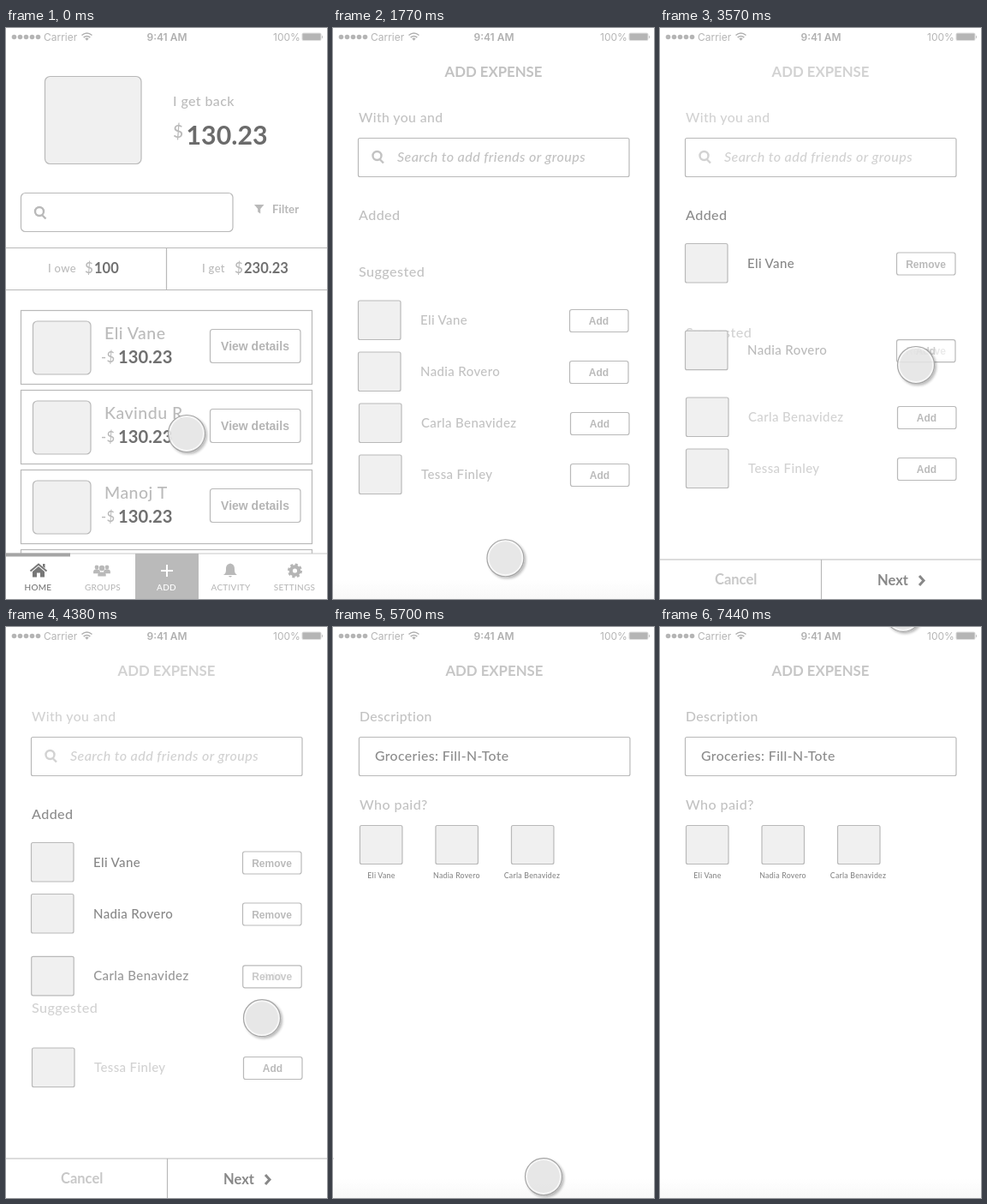
Write an HTML page that moves like this. It is 375 px wide and 666 px high and loops after 7.53 s.

```html
<!DOCTYPE html>
<html lang="en">
<head>
<meta charset="utf-8">
<title>Add expense wireframe</title>
<style>
html, body { margin: 0; width: 100%; height: 100%; overflow: hidden; background: #fff; }
svg { display: block; width: 375px; height: 666px; font-family: Lato, "Open Sans", sans-serif; font-weight: 500; }
text { letter-spacing: .025em; }
text[font-weight], .btn, .status text { letter-spacing: 0; }
.status { font-family: Inter, Roboto, sans-serif; font-weight: 400; }
.btn { font-family: "Liberation Sans", Arial, sans-serif; font-weight: 700; }
.dim { fill: var(--dim); }
.dimLine { stroke: var(--dim); }
</style>
</head>
<body>
<svg id="stage" viewBox="0 0 375 666"></svg>
<script>
const LOOP = 7530, LINE = '#b9b9b9';
const friends = ['Eli Vane', 'Nadia Rovero', 'Carla Benavidez', 'Tessa Finley'];
const debtors = ['Eli Vane', 'Kavindu R', 'Manoj T', ''];

const text = (x, y, size, fill, str, attrs = '') =>
  `<text x="${x}" y="${y}" font-size="${size}" fill="${fill}" ${attrs}>${str}</text>`;
const box = (x, y, w, h, r = 0, fill = '#fff', line = LINE) =>
  `<rect x="${x}" y="${y}" width="${w}" height="${h}" rx="${r}" fill="${fill}" stroke="${line}" stroke-width="1.2"/>`;
const path = (d, color = LINE, width = 1, attrs = '') =>
  `<path d="${d}" fill="none" stroke="${color}" stroke-width="${width}" ${attrs}/>`;
const solid = (d, fill) => `<path d="${d}" fill="${fill}"/>`;
const group = (id, body) => `<g id="${id}">${body}</g>`;
const thumb = (x, y, w, h, r) => box(x, y, w, h, r, '#f0f0f0');
const search = (x, y, color, attrs = '') =>
  path(`M${x + 5} ${y - 1}a5 5 0 1 0-10 0a5 5 0 1 0 10 0M${x + 3} ${y + 3}l4.5 4.5`, color, 2.4, attrs);
const bold = 'font-weight="700"';
const mid = 'text-anchor="middle"';
const title = attrs => text(187.5, 56.5, 16.8, '#c6c6c6', 'ADD EXPENSE', `${bold} ${mid} ${attrs}`);

function statusBar() {
  let s = '';
  for (let i = 0; i < 5; i++) s += `<circle cx="${9.5 + 7 * i}" cy="10.5" r="2.8" fill="#b5b5b5"/>`;
  return s + text(44, 14.5, 12, '#b5b5b5', 'Carrier')
    + path('M88.5 8.5q6-5 12 0M90.7 11q3.8-3 7.6 0', '#b0b0b0', 1.6)
    + solid('M92.3 12.3q2.2-1.6 4.4 0l-2.2 2.4z', '#b0b0b0')
    + text(188, 14.5, 12, '#b0b0b0', '9:41 AM', `font-weight="600" ${mid}`)
    + text(312, 14.5, 12, '#b5b5b5', '100%')
    + '<rect x="345.5" y="5.5" width="23" height="9.5" rx="2" fill="#dcdcdc"/>'
    + '<rect x="346.5" y="6.5" width="21" height="7.5" rx="1" fill="#b5b5b5"/>'
    + solid('M369 8.5q2 2 0 4z', '#b8b8b8');
}

function debtCard(name, i) {
  const y = 329.5 + 93 * i;
  return box(17.5, y, 340, 86) + thumb(31.5, y + 12.5, 67.5, 62, 5)
    + text(115, y + 33.5, 19.5, '#bbb', name)
    + text(111, y + 60.5, 16.5, '#bbb', '-$')
    + text(131, y + 61.5, 20.2, '#707070', '130.23', bold)
    + box(238.5, y + 22, 105.5, 39, 3)
    + text(291, y + 46, 14, '#b5b5b5', 'View details', `class="btn" ${mid}`);
}

function tabBar() {
  const tab = (x, str, color) => text(x, 656, 10, color, str, mid);
  let s = '<rect y="613" width="375" height="53" fill="#fff"/>' + path('M0 613H375', '#c8c8c8')
    + '<rect y="612.5" width="75" height="4" fill="#a5a5a5"/>'
    + '<rect x="151" y="613" width="74" height="53" fill="#bababa"/>'
    + path('M28.5 633.5l9.5-8 9.5 8', '#777', 2)
    + solid('M43 625h2.5v5l-2.5-2zM31 634l7-6 7 6v6.5h-5v-5h-4v5h-5z', '#777')
    + path('M181 633h14M188 626v14', '#fff', 2)
    + solid('M262 624.5c4 1 5 3 5 7 0 4 1 5 3 6.5h-16c2-1.5 3-2.5 3-6.5 0-4 1-6 5-7zM260 639h4q-2 3-4 0z', LINE)
    + '<circle cx="337.5" cy="633" r="4.7" fill="none" stroke="#b5b5b5" stroke-width="4.2"/>'
    + '<circle cx="337.5" cy="633" r="7" fill="none" stroke="#b5b5b5" stroke-width="3" stroke-dasharray="3 2.5"/>';
  for (const [x, y, r] of [[106, 629, 2.4], [118, 629, 2.4], [112, 630, 3.2]])
    s += `<circle cx="${x}" cy="${y}" r="${r}" fill="${LINE}"/>`
      + solid(`M${x - r - 1.5} ${y + 3 * r}v-2q0-3 ${r + 1.5}-3t${r + 1.5} 3v2z`, LINE);
  return s + tab(37.5, 'HOME', '#777') + tab(113, 'GROUPS', LINE) + tab(187.5, 'ADD', '#fff')
    + tab(262.5, 'ACTIVITY', LINE) + tab(337, 'SETTINGS', LINE);
}

const homePage = () => thumb(45.5, 56.5, 112.5, 102, 6)
  + text(195, 90.5, 16, '#bbb', 'I get back') + text(195, 128, 21, '#bbb', '$')
  + text(210.5, 135.5, 30.3, '#6b6b6b', '130.23', bold)
  + box(17.5, 192.5, 247.5, 45, 5) + search(39, 215, LINE)
  + solid('M290 206h11.5l-4.3 5v5.5l-3-2v-3.5z', LINE)
  + text(311, 216, 13.3, '#b8b8b8', 'Filter', bold)
  + path('M0 256.5H375M0 305.5H375M187.5 256V305', LINE, 1.2)
  + text(49, 284.5, 13, '#bbb', 'I owe') + text(92, 286, 17, '#bbb', '$')
  + text(103, 286, 16.5, '#707070', '100', bold)
  + text(229, 284.5, 13, '#bbb', 'I get') + text(267, 286, 17, '#bbb', '$')
  + text(278, 286, 16.5, '#707070', '230.23', bold)
  + debtors.map(debtCard).join('') + tabBar();

const friendRow = (name, i) => group('row' + i,
  thumb(29.5, -23, 49.5, 45.5, 2)
  + text(102, 5, 15, '#bbb', name, `id="name${i}"`)
  + box(276.5, -12.5, 68.5, 26, 2.5)
  + text(310.5, 5, 12, '#bbb', 'Add', `class="btn" id="add${i}" ${mid}`)
  + text(310.5, 5, 12, '#bbb', 'Remove', `class="btn" id="remove${i}" ${mid}`));

const choosePage = () => title('class="dim"')
  + text(30, 110, 15.8, '', 'With you and', 'class="dim"')
  + box(29.5, 128.5, 316.5, 45, 2) + search(51.5, 150, '', 'class="dimLine"')
  + text(75, 156, 16.1, '', 'Search to add friends or groups', 'class="dim" font-style="italic"')
  + text(30, 224, 16.1, '#bbb', 'Added', 'id="added"')
  + text(30, 290, 16.2, '', 'Suggested', 'class="dim" id="suggested"')
  + friends.map(friendRow).join('');

const actionBar = () => '<rect y="620" width="375" height="46" fill="#fff"/>'
  + path('M0 620H375M188.5 620V666', LINE, 1.2)
  + text(64, 649, 16.5, '#c8c8c8', 'Cancel', bold)
  + text(254, 650, 16.5, '#888', 'Next', bold)
  + path('M303 639l5 5.5-5 5.5', '#888', 3);

const paidPage = () => title('')
  + text(30, 110, 15.8, '#c2c2c2', 'Description')
  + box(29.5, 128.5, 316.5, 45, 2)
  + text(48, 156, 15.8, '#8c8c8c', 'Groceries: Fill-N-Tote')
  + text(30, 213, 16.1, '#c2c2c2', 'Who paid?')
  + friends.slice(0, 3).map((name, i) => thumb(30.5 + 88.5 * i, 231.5, 49.5, 45, 2)
    + text(55.5 + 88 * i, 293, 8.8, '#888', name, mid)).join('');

const stage = document.getElementById('stage');
stage.innerHTML = `<defs>
  <linearGradient id="fade" x2="0" y2="1"><stop stop-color="#fff"/><stop offset="1" stop-color="#f8f8f8"/></linearGradient>
  <filter id="shadow" x="-30%" y="-30%" width="160%" height="160%">
    <feDropShadow dx="2" dy="2" stdDeviation="1.5" flood-color="#000" flood-opacity=".3"/></filter></defs>
  <rect y="643" width="375" height="23" fill="url(#fade)"/>`
  + group('home', homePage()) + group('choose', choosePage()) + group('paid', paidPage())
  + group('bar', actionBar()) + `<g class="status">${statusBar()}</g>`
  + group('pointer', `<g filter="url(#shadow)" opacity=".88">
    <circle r="21.5" fill="#f6f6f6" stroke="#999" stroke-width="1.2"/><circle r="19" fill="#e4e4e4"/></g>`);

const el = {};
stage.querySelectorAll('[id]').forEach(e => el[e.id] = e);
const place = (id, x, y) => el[id].setAttribute('transform', `translate(${x} ${y})`);
const mix = (a, b, p) => a + (b - a) * p;
const gray = v => `rgb(${v},${v},${v})`;
const ramp = (t, start, dur) => Math.min(1, Math.max(0, (t - start) / dur));
const glide = (t, start, dur) => 1 - (1 - ramp(t, start, dur)) ** 5;

// Damped spring with about 7% overshoot
function spring(t, start) {
  const s = (t - start) / 1000, w = 8.5, k = 7.2;
  return s <= 0 ? 0 : 1 - Math.exp(-k * s) * (Math.cos(w * s) + k / w * Math.sin(w * s));
}

function pointerAt(t) {
  const up = glide(t, 6030, 360);
  const moves = [
    [spring(t, 0), -15, 160],
    [spring(t, 1740), 106, -288],
    [glide(t, 2910, 450), -3, 48],
    [spring(t, 3600), 0, 63.5],
    [spring(t, 4560), -53, 184.5],
    [up, 60, -419],
    [spring(t, 6630), -22, -239]
  ];
  let x = 211 + 240 * up * (1 - up), y = 473;
  for (const [p, dx, dy] of moves) { x += dx * p; y += dy * p; }
  return [x, y];
}

function draw(t) {
  const enter = glide(t, 1050, 400), swap = glide(t, 5387, 450);
  const add = [glide(t, 2910, 450), glide(t, 3540, 450), glide(t, 4262, 450), 0];
  const dim = mix(194, 210, add[0]);

  el.home.setAttribute('opacity', 1 - ramp(t, 620, 310));
  el.choose.setAttribute('opacity', enter);
  place('choose', -375 * swap, 628 * (1 - enter));
  place('paid', 375 * (1 - swap), 0);
  place('bar', -375 * swap, 47 * (1 - add[0]));

  stage.style.setProperty('--dim', gray(dim));
  el.added.setAttribute('fill', gray(mix(192, 140, add[0])));
  place('suggested', 0, 53 * add[0] + 60 * (add[1] + add[2]));
  friends.forEach((_, i) => {
    const p = add[i];
    const y = 341 + 60 * i - (i ? 7 * add[0] + 59.5 * p : 66.5 * p);
    place('row' + i, i > 1 ? 1 - p : 0, y);
    el['name' + i].setAttribute('fill', gray(mix(dim, 135, p)));
    el['add' + i].setAttribute('opacity', 1 - p);
    el['remove' + i].setAttribute('opacity', p);
  });
  place('pointer', ...pointerAt(t));
}

const began = performance.now();
function tick() {
  draw((performance.now() - began) % LOOP);
  requestAnimationFrame(tick);
}
draw(0);
requestAnimationFrame(tick);
</script>
</body>
</html>
```
